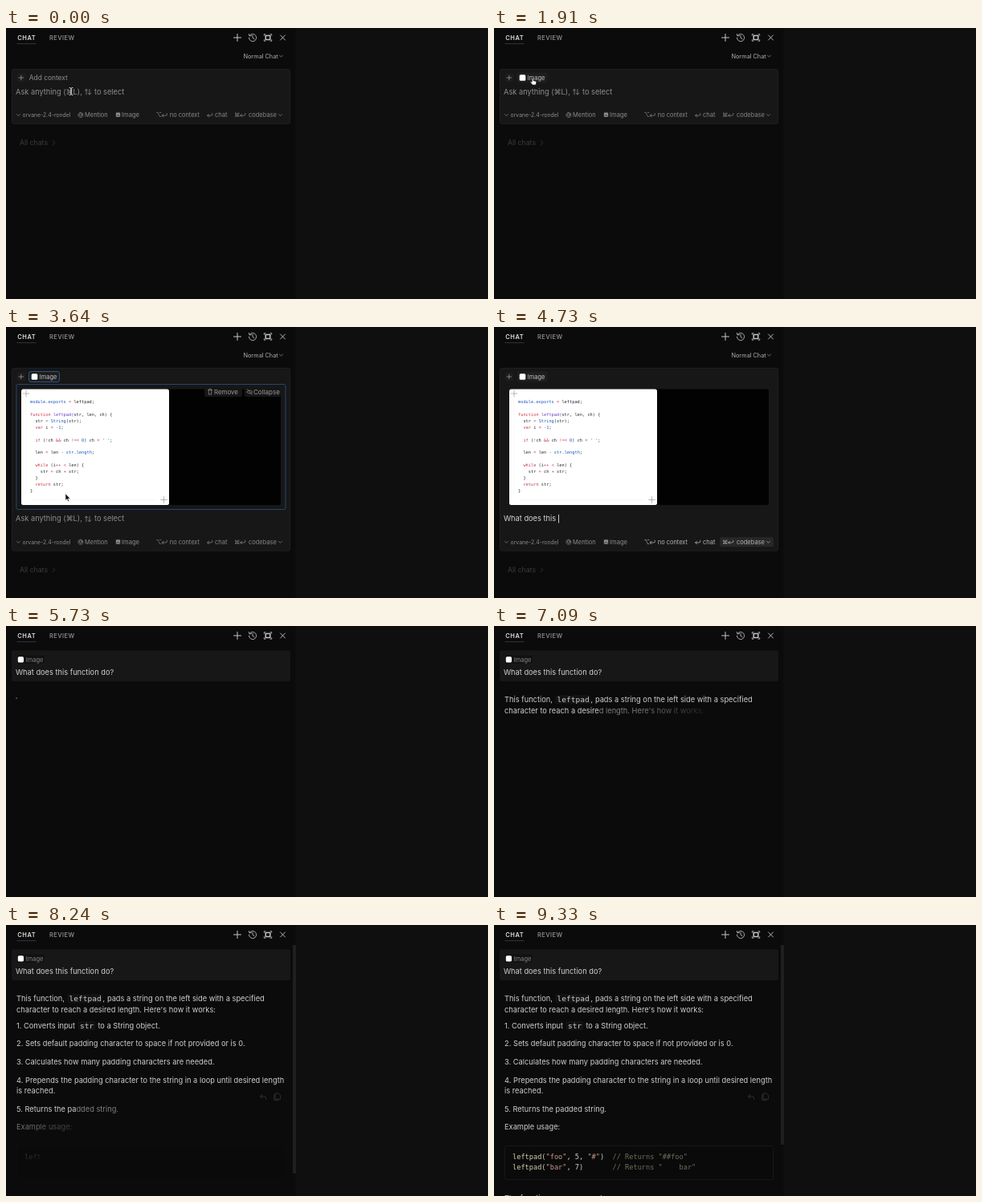
Animation, 600 px wide and 338 px high, one loop 9640 ms. Source, as an HTML page:

```html
<!DOCTYPE html>
<html lang="en">
<head>
<meta charset="utf-8">
<title>Chat panel</title>
<style>
html, body { margin: 0; width: 100%; height: 100%; overflow: hidden; background: #0f0f10; }
svg { display: block; width: 600px; height: 338px; }
text { font-family: Inter, "DejaVu Sans", sans-serif; white-space: pre; }
.mono { font-family: "DejaVu Sans Mono", "Liberation Mono", monospace; }
.line { fill: none; stroke-linecap: round; stroke-linejoin: round; }
</style>
</head>
<body>
<svg id="stage" viewBox="0 0 600 338"></svg>
<script>
const LOOP = 9640;
const BODY = 9.26;
const stage = document.getElementById('stage');
const $ = id => document.getElementById(id);

// Markup helpers
const text = (x, y, s, size, fill, more = '') =>
  `<text x="${x}" y="${y}" font-size="${size}" fill="${fill}" ${more}>${s}</text>`;
const rect = (x, y, w, h, fill, more = '') =>
  `<rect x="${x}" y="${y}" width="${w}" height="${h}" fill="${fill}" ${more}/>`;
const line = (d, color, w = 0.8, more = '') =>
  `<path class="line" d="${d}" stroke="${color}" stroke-width="${w}" ${more}/>`;
const group = (id, body, more = '') => `<g id="${id}" ${more}>${body}</g>`;
const escape = s => s.replace(/&/g, '&amp;').replace(/</g, '&lt;');
const enter = (x, y, color) =>
  line(`M${x + 6} ${y - 2.6}q1.6 2.8-1.4 2.8h-4.4m1.8-1.8l-1.8 1.8l1.8 1.8`, color);
const down = (x, y, color) => line(`M${x - 2} ${y - 0.8}l2 1.8l2-1.8`, color, 0.7);

// Header
const header =
  text(14.3, 14.6, 'CHAT', 7.5, '#dedede', 'font-weight="600" letter-spacing=".5"') +
  text(54, 14.6, 'REVIEW', 7.5, '#858585', 'font-weight="600" letter-spacing=".4"') +
  rect(13.5, 19.3, 24, 0.8, '#3a414d') +
  line('M283.5 12h9M288 7.5v9', '#c4c4c4', 1) +
  line('M303.4 9.2a4.6 4.6 0 1 1-1 3M302.4 7.6l.6 2.4l2.4-.4M307 9.4v3l2 1.2', '#bbb', 0.9) +
  line('M321.3 9.2V7.8h1.6M329.1 7.8h1.6v1.4M330.7 14.8v1.4h-1.6M322.9 16.2h-1.6v-1.4', '#c4c4c4', 0.9) +
  line('M323.2 9.6h5.6v4.8h-5.6z', '#c4c4c4', 1.5) +
  line('M341.6 9l5.8 6M347.4 9l-5.8 6', '#c4c4c4', 0.9);

// Image shown in the attachment preview
const CODE = [
  'module.exports = leftpad;', '', 'function leftpad(str, len, ch) {', '  str = String(str);',
  '  var i = -1;', '', "  if (!ch && ch !== 0) ch = ' ';", '', '  len = len - str.length;', '',
  '  while (i++ < len) {', '    str = ch + str;', '  }', '  return str;', '}'
];
const tint = [
  [/^(function|var|if|while|return|[=!&+<-]+)$/, '#c83a4c'],
  [/^(module\.exports|String|str\.length|-1|0|' ')$/, '#1c58c4'],
  [/^leftpad(?=\()/, '#6f42c1']
];
const colorCode = s => (s.match(/module\.exports|str\.length|leftpad\(|-1|' '|\w+|[=!&+<-]+|\s+|./g) || [])
  .map(t => {
    const hit = tint.find(([re]) => re.test(t));
    return `<tspan fill="${hit ? hit[1] : '#24292e'}">${escape(t)}</tspan>`;
  }).join('');
const preview =
  rect(19, 77.5, 323, 144.5, '#020202', 'rx="3"') +
  rect(19, 77.5, 184, 144.5, '#fff', 'rx="2.5"') +
  line('M21 83h8M25 79v8M192.5 215.5h8M196.5 211.5v8', '#8a8a8a', 0.6) +
  line('M25 88v120M32 215.5h156', '#eeeeee', 0.4) +
  CODE.map((s, i) => text(30, 94.7 + i * 7.97, colorCode(s), 5.32, '#24292e', 'class="mono"')).join('') +
  group('focus',
    rect(13, 71.5, 335, 156, 'none', 'rx="2" stroke="#25466f"') +
    rect(247, 75, 47, 12, '#161616', 'rx="2"') + rect(297, 75, 45, 12, '#161616', 'rx="2"') +
    line('M251.5 78.5h5M252.3 78.5v5.5h3.4v-5.5M253 77.2h2', '#999', 0.7) +
    text(259, 83.8, 'Remove', 7.9, '#999') +
    line('M300 81q3.4-4 6.8 0q-3.4 4-6.8 0M300.4 77.6l6 6.6', '#999', 0.7) +
    text(308, 83.8, 'Collapse', 8, '#999'));

// Prompt box
const actions = color =>
  text(186.5, 111.2, '⌥', 7.4, color) + enter(194, 109, color) + text(203.8, 111.2, 'no context', 7.45, color) +
  enter(250.5, 109, color) + text(260, 111.2, 'chat', 7.6, color) +
  text(284, 111.2, '⌘', 7.4, color) + enter(291.5, 109, color) + text(302, 111.2, 'codebase', 7.5, color) +
  down(341.5, 108.5, color);
const toolbar =
  down(15.5, 108.5, '#8a8a8a') + text(20.5, 111.2, 'orvane-2.4-rondel', 6.9, '#8a8a8a') +
  line('M95.4 110.5a3.1 3.1 0 1 1 .7-2.2q-.3 1.8-1.5.8v-2M94.6 108.3a1.6 1.6 0 1 1-3.2 0a1.6 1.6 0 1 1 3.2 0', '#8a8a8a', 0.7) +
  text(98, 111.2, 'Mention', 7.5, '#8a8a8a') +
  rect(136.8, 105.6, 5.4, 5.4, '#8a8a8a', 'rx=".8"') + line('M137.8 109.8l1.4-1.6l2 1.8', '#1a1a1a', 0.7) +
  text(144, 111.2, 'Image', 7.6, '#8a8a8a') +
  group('idle', actions('#868686')) +
  group('ready', rect(281, 102.5, 67, 12, '#272727', 'rx="2"') + actions('#b4b4b4'));
const placeholder =
  text(12, 82.8, 'Ask anything (', BODY, '#8c8c8c') + text(74.5, 82.8, '⌘', BODY, '#8c8c8c') +
  text(83.6, 82.8, 'L),', BODY, '#8c8c8c') +
  line('M100 83v-6.6m-1.9 1.9l1.9-1.9l1.9 1.9M104 76.4v6.6m-1.9-1.9l1.9 1.9l1.9-1.9', '#8c8c8c', 0.8) +
  text(110, 82.8, 'to select', BODY, '#8c8c8c');
const compose = group('compose',
  text(295.5, 37.5, 'Normal Chat', 7.3, '#b0b0b0') + down(342.5, 35, '#999') +
  `<rect id="box" x="7.5" y="51.5" width="346" height="68" rx="2" fill="#171717" stroke="#222" stroke-width=".8"/>` +
  rect(13.5, 56.5, 11, 11, '#1c1c1c', 'rx="2"') + line('M16 62h5.6M18.8 59.2v5.6', '#999', 0.8) +
  group('add', text(28.8, 65, 'Add context', 8.4, '#8f8f8f')) +
  group('chip',
    `<rect id="chipBox" x="28.5" y="55.5" width="38" height="13" rx="2.5" fill="#1e1e1e"/>` +
    `<rect id="thumb" x="31.7" y="58.2" width="7.6" height="7.6" rx="1.5" fill="#fff"/>` +
    text(41.8, 64.8, 'Image', 7.4, '#c4c4c4')) +
  `<clipPath id="reveal"><rect id="clip" x="8" y="70" width="345" height="0"/></clipPath>` +
  group('preview', preview, 'clip-path="url(#reveal)"') +
  group('lower',
    group('hint', placeholder) + text(12, 82.8, '', BODY, '#d6d6d6', 'id="typed"') +
    `<rect id="caret" y="74.2" width=".9" height="10.6" fill="#ddd"/>` + toolbar +
    text(17, 146, 'All chats', 8.7, '#3c3c3c') + line('M58.5 140.5l2.2 2.5l-2.2 2.5', '#3c3c3c', 0.8)));

// Streamed answer: x, baseline, size, class, parts of [text, colour]
const INK = '#cfcfcf', FN = '#d3d1b0', STR = '#cf9a8c', NOTE = '#6e6e5a';
const plain = (y, s, x = 13) => [x, y, BODY, '', [[s, INK]]];
const mono = (x, y, s) => [x, y, 9.5, 'mono', [[s, INK]]];
const code = (y, ...parts) => [23, y, 8.62, 'mono', parts];
const ANSWER = [
  plain(94.5, 'This function,'), mono(78.5, 94.5, 'leftpad'),
  plain(94.5, ', pads a string on the left side with a specified', 120.6),
  plain(108.5, "character to reach a desired length. Here's how it works:"),
  plain(128.6, '1. Converts input'), mono(92, 128.6, 'str'), plain(128.6, 'to a String object.', 114.4),
  plain(150.7, '2. Sets default padding character to space if not provided or is 0.'),
  plain(173.5, '3. Calculates how many padding characters are needed.'),
  plain(196.8, '4. Prepends the padding character to the string in a loop until desired length'),
  plain(210.4, 'is reached.'),
  plain(233.3, '5. Returns the padded string.'),
  plain(255.2, 'Example usage:'),
  code(292, ['leftpad', FN], ['(', INK], ['"foo"', STR], [', 5, ', INK], ['"#"', STR], [')  ', INK], ['// Returns "##foo"', NOTE]),
  code(305, ['leftpad', FN], ['(', INK], ['"bar"', STR], [', 7)       ', INK], ['// Returns "    bar"', NOTE]),
  plain(343.8, 'The function never overpads')
];
const answer = ANSWER.map(([x, y, size, cls, parts]) =>
  text(x, y, parts.map(([s, fill]) =>
    [...s].map(c => `<tspan class="ch" fill="${fill}">${c}</tspan>`).join('')).join(''),
    size, INK, `class="${cls}"`)).join('');
const reply = group('reply',
  rect(7, 30.5, 347, 38.5, '#171717', 'rx="2"') +
  rect(13.5, 36, 35, 11.5, '#111', 'rx="2" stroke="#1d1d1d" stroke-width=".6"') +
  rect(14.8, 38.2, 7.2, 7.2, '#fff', 'rx="1.5"') + text(24.8, 44.6, 'Image', 7.4, '#858585') +
  text(12, 61, 'What does this function do?', BODY, '#d0d0d0') +
  [0, 1, 2].map(i => rect(12.3 + 3 * i, 89.2, 1.5, 1.5, '#999', `rx=".75" id="dot${i}"`)).join('') +
  group('codeBox', rect(13.5, 275.5, 334, 42, '#0a0a0a', 'rx="2" stroke="#171717"')) +
  rect(76, 86, 44, 11.5, '#131313', 'rx="2" id="bgA"') + rect(90, 120, 21, 11.5, '#131313', 'rx="2" id="bgB"') +
  answer +
  group('tools',
    line('M319 211.5l-2.5 2.3l2.5 2.3M316.7 213.8h4.3q3 0 3 3.6', '#363636', 0.9) +
    line('M335.5 210h3.6l2.4 2.4v4.8h-6zM335.5 212h-1.8v6.6h5.4v-1.4', '#363636', 0.8)) +
  `<rect id="thumbBar" x="357" y="25" width="4" fill="#1f1f1f"/>`);

// Pointers, drawn around their hot spot
const pointers =
  group('beam', line('M-2.2-4.6q2.2 0 2.2 1.4v6.4q0 1.4-2.2 1.4M2.2-4.6q-2.2 0-2.2 1.4v6.4q0 1.4 2.2 1.4', '#111', 2.2) +
    line('M-2-4.6q2 0 2 1.4v6.4q0 1.4-2 1.4M2-4.6q-2 0-2 1.4v6.4q0 1.4 2 1.4', '#ddd', 1)) +
  group('hand', '<path d="M-.8-3.4q1-1 1.8 0v2.6l3 .6q.9.4.8 1.3l-.6 3.4h-4.4l-2.6-3.4q.2-1.3 1.4-.5l.6.5z" fill="#fff" stroke="#111" stroke-width=".7"/>') +
  group('arrow', '<path d="M0-4v9l2.1-1.8l1.3 3l1.5-.7l-1.3-2.9h2.8z" fill="#111" stroke="#fff" stroke-width=".8"/>');

stage.innerHTML = rect(0, 0, 600, 338, '#0f0f10') + rect(0, 0, 361, 338, '#0b0b0c') +
  rect(360.6, 0, 0.6, 338, '#131314') + header + compose + reply + pointers;

const chars = [...document.querySelectorAll('.ch')];
const QUESTION = 'What does this function do?';
const clamp = v => Math.max(0, Math.min(1, v));
const show = (id, v) => $(id).setAttribute('opacity', +v);
const set = (id, name, v) => $(id).setAttribute(name, v);

// Linear track through [time, value] points
function track(t, points) {
  let [t0, v0] = points[0];
  for (const [t1, v1] of points) {
    if (t < t1) return t1 > t0 ? v0 + (v1 - v0) * clamp((t - t0) / (t1 - t0)) : v0;
    [t0, v0] = [t1, v1];
  }
  return v0;
}
const smooth = u => u * u * (3 - 2 * u);

function drawPointer(t) {
  let kind = 'beam', x = 81, y = 79;
  if (t >= 1360) {
    const u = smooth(clamp((t - 1360) / 160));
    x = 81 - 33 * u;
    y = 79 - 12.5 * u;
    if (u > 0.7) kind = 'hand';
    else if (u > 0.4) kind = 'arrow';
  }
  if (t >= 2910) {
    const u = smooth(clamp((t - 2910) / 940));
    x = 48 * (1 - u) ** 2 - 50 * u * (1 - u) + 103 * u * u;
    y = 66.5 + 166 * u;
    kind = u < 0.03 ? 'hand' : u < 0.98 ? 'arrow' : 'beam';
  }
  for (const id of ['beam', 'hand', 'arrow']) {
    show(id, id === kind && t < 4120);
    set(id, 'transform', `translate(${x} ${y})`);
  }
}

function drawCompose(t) {
  const pasted = clamp((t - 520) / 150);
  const open = 1 - (1 - clamp((t - 1970) / 400)) ** 3;
  const shift = 159.7 * open;
  const focused = t >= 1970 && t < 3900;
  show('add', 1 - pasted);
  show('chip', pasted);
  set('chipBox', 'stroke', focused ? '#2c5288' : 'none');
  set('thumb', 'fill', t < 1030 ? '#e4e4e4' : '#fff');
  set('box', 'height', 68 + shift);
  set('clip', 'height', shift);
  set('lower', 'transform', `translate(0 ${shift})`);
  show('focus', focused);

  const count = Math.floor(clamp((t - 4080) / 1170) * QUESTION.length);
  $('typed').textContent = QUESTION.slice(0, count);
  show('hint', !count);
  show('idle', t < 3900);
  show('ready', t >= 3900);
  set('caret', 'x', count ? 12.4 + $('typed').getComputedTextLength() : 11.6);
  show('caret', t >= 3900 || (t >= 520 && t < 1030) || (t >= 1520 && t < 1910));
}

function drawReply(t) {
  const dots = t < 5700 ? 0 : t < 5850 ? 1 : t < 6000 ? 2 : t < 6210 ? 3 : t < 6360 ? 0 : t < 6550 ? 1 : 2;
  for (let i = 0; i < 3; i++) show('dot' + i, i < dots && t < 6700);
  const head = track(t, [[6680, 0], [7090, 126], [7640, 228], [8240, 421], [9060, chars.length + 32]]);
  chars.forEach((c, i) => {
    const age = head - i;
    c.setAttribute('fill-opacity', age <= 0 ? 0 : age > 30 ? 1 : Math.min(0.6, 0.12 + age / 40));
  });
  show('bgA', head > 22);
  show('bgB', head > 148);
  show('codeBox', clamp((head - 415) / 40));
  show('tools', t >= 8000);
  show('thumbBar', t >= 8100);
  const bottom = t >= 9330 ? 274 : track(t, [[8100, 334], [8240, 310], [9060, 283]]);
  set('thumbBar', 'height', bottom - 25);
}

function frame(now) {
  const t = now % LOOP;
  const sent = t >= 5500;
  $('compose').style.display = sent ? 'none' : '';
  $('reply').style.display = sent ? '' : 'none';
  drawPointer(t);
  if (sent) drawReply(t);
  else drawCompose(t);
}

const start = performance.now();
function tick() {
  frame(performance.now() - start);
  requestAnimationFrame(tick);
}
tick();
</script>
</body>
</html>
```
